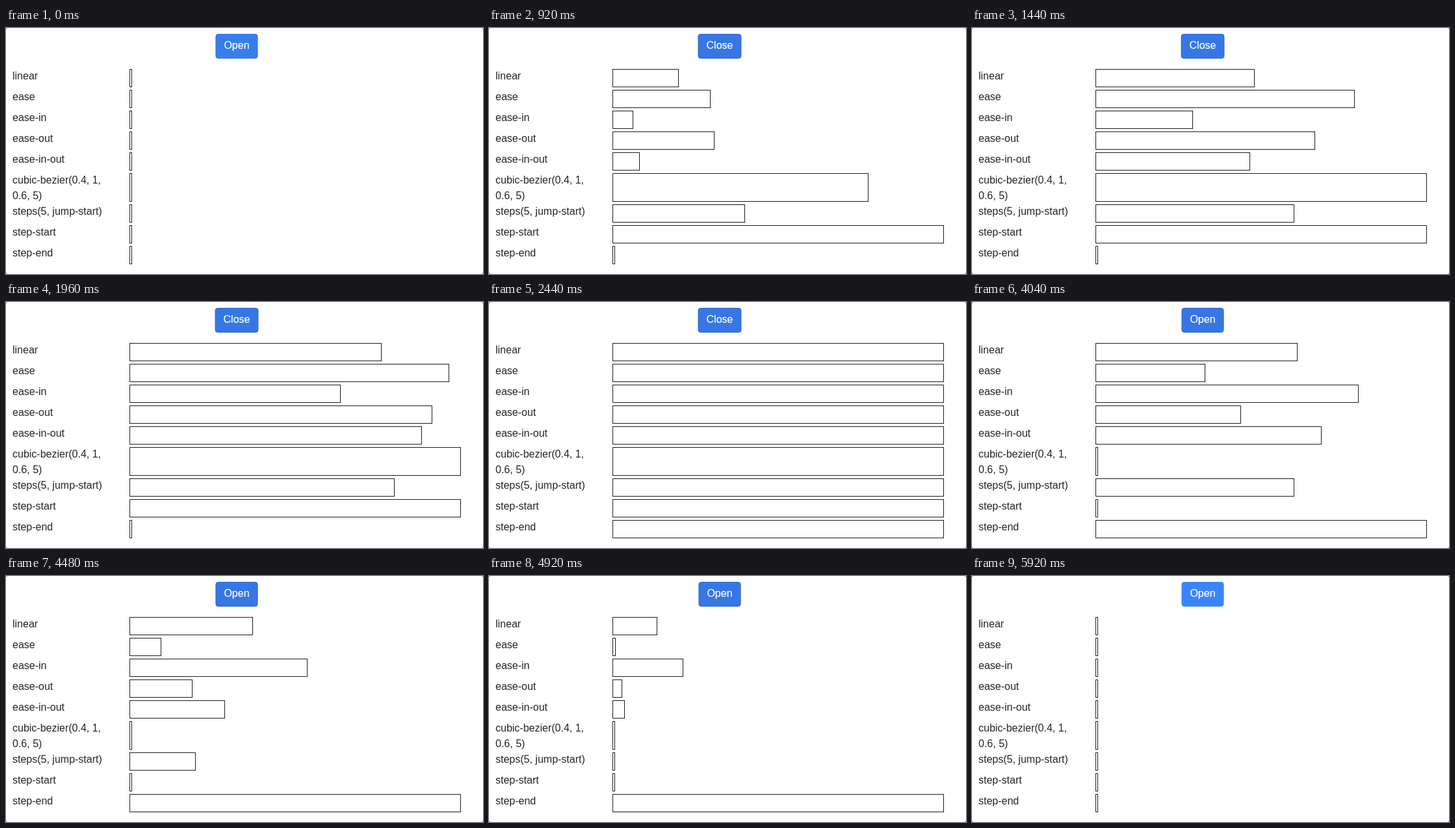
Animation, 734 px wide and 378 px high, one loop 6.36 s. Source, as an HTML page:

```html
<!DOCTYPE html>
<html lang="en">
<head>
<meta charset="utf-8">
<title>Timing functions</title>
<style>
  html, body { margin: 0; width: 100%; height: 100%; overflow: hidden; background: #fff; }
  svg { display: block; }
  text { font: 16px "Liberation Sans", Arial, Helvetica, sans-serif; fill: #212529; }
  .bar { fill: #fff; stroke: #1c1c1c; stroke-width: 1; }
  #label { fill: #fff; text-anchor: middle; stroke: #fff; stroke-width: .2; }
</style>
</head>
<body>
<svg id="stage" width="734" height="378" viewBox="0 0 734 378">
  <rect width="734" height="378" fill="#fff"/>
  <path d="M0 0h2l-2 2zM734 0h-2l2 2zM0 378h2l-2-2zM734 378h-2l2-2z" fill="#999"/>
  <rect id="button" y="9.5" height="37" rx="3.5"/>
  <text id="label" x="355" y="32"></text>
</svg>
<script>
(() => {
  const LOOP = 6360, TICK = 40, DURATION = 1855;
  const OPEN_AT = 549, CLOSE_AT = 3315;
  const BAR_X = 190, MIN_WIDTH = 4, MAX_WIDTH = 510;
  const HOVER = [55, 126, 236], ACTIVE = [54, 119, 229], REST = [59, 133, 250];
  const HOVER_EDGE = [47, 113, 218], ACTIVE_EDGE = [41, 101, 202];

  const clamp = (v, lo, hi) => Math.min(hi, Math.max(lo, v));
  const mix = (a, b, k) => a.map((v, i) => v + (b[i] - v) * k);
  const rgb = c => `rgb(${c.map(Math.round).join()})`;

  function bezier(x1, y1, x2, y2) {
    const at = (a, b, u) => 3 * a * u * (1 - u) ** 2 + 3 * b * u * u * (1 - u) + u ** 3;
    return p => {
      if (p <= 0 || p >= 1) return p;
      let lo = 0, hi = 1;
      for (let i = 0; i < 30; i++) {
        const mid = (lo + hi) / 2;
        if (at(x1, x2, mid) < p) lo = mid; else hi = mid;
      }
      return at(y1, y2, lo);
    };
  }

  const rows = [
    [["linear"], p => p],
    [["ease"], bezier(.25, .1, .25, 1)],
    [["ease-in"], bezier(.42, 0, 1, 1)],
    [["ease-out"], bezier(0, 0, .58, 1)],
    [["ease-in-out"], bezier(.42, 0, .58, 1)],
    [["cubic-bezier(0.4, 1,", "0.6, 5)"], bezier(.4, 1, .6, 5)],
    [["steps(5, jump-start)"], p => Math.min(1, (Math.floor(p * 5) + 1) / 5)],
    [["step-start"], () => 1],
    [["step-end"], p => p < 1 ? 0 : 1]
  ];

  const stage = document.getElementById("stage");
  const button = document.getElementById("button");
  const label = document.getElementById("label");

  function add(name, attrs, content = "") {
    const el = document.createElementNS("http://www.w3.org/2000/svg", name);
    for (const key in attrs) el.setAttribute(key, attrs[key]);
    el.textContent = content;
    return stage.appendChild(el);
  }

  let rowY = 63;
  const bars = rows.map(([lines, ease]) => {
    lines.forEach((line, i) => add("text", { x: 10, y: rowY + 16 + 24 * i }, line));
    const height = lines.length > 1 ? 44 : 28;
    const el = add("rect", { class: "bar", x: BAR_X + .5, y: rowY + .5, height: height - 1 });
    rowY += height + 4;
    return { el, ease };
  });

  function openness(ease, t) {
    if (t < OPEN_AT) return 0;
    if (t < CLOSE_AT) return ease(Math.min(1, (t - OPEN_AT) / DURATION));
    return 1 - ease(Math.min(1, (t - CLOSE_AT) / DURATION));
  }

  function drawButton(t) {
    const opened = t >= OPEN_AT && t < CLOSE_AT;
    const width = opened ? 66.9 : 65.1;
    const press = clamp((t - 440) / 120, 0, 1);
    const leave = clamp((t - 5840) / 80, 0, 1);
    const fill = mix(mix(HOVER, ACTIVE, press), REST, leave);
    const edge = mix(mix(HOVER_EDGE, ACTIVE_EDGE, press), REST, leave);
    button.setAttribute("x", 355 - width / 2 + .5);
    button.setAttribute("width", width - 1);
    button.setAttribute("fill", rgb(fill));
    button.setAttribute("stroke", rgb(edge));
    label.textContent = opened ? "Close" : "Open";
  }

  function render(time) {
    const t = Math.floor((time % LOOP) / TICK) * TICK;
    drawButton(t);
    for (const { el, ease } of bars) {
      const width = clamp(Math.round(MAX_WIDTH * openness(ease, t)), MIN_WIDTH, MAX_WIDTH);
      el.setAttribute("width", width - 1);
    }
  }

  const start = performance.now();
  function tick() {
    render(performance.now() - start);
    requestAnimationFrame(tick);
  }
  tick();
})();
</script>
</body>
</html>
```
